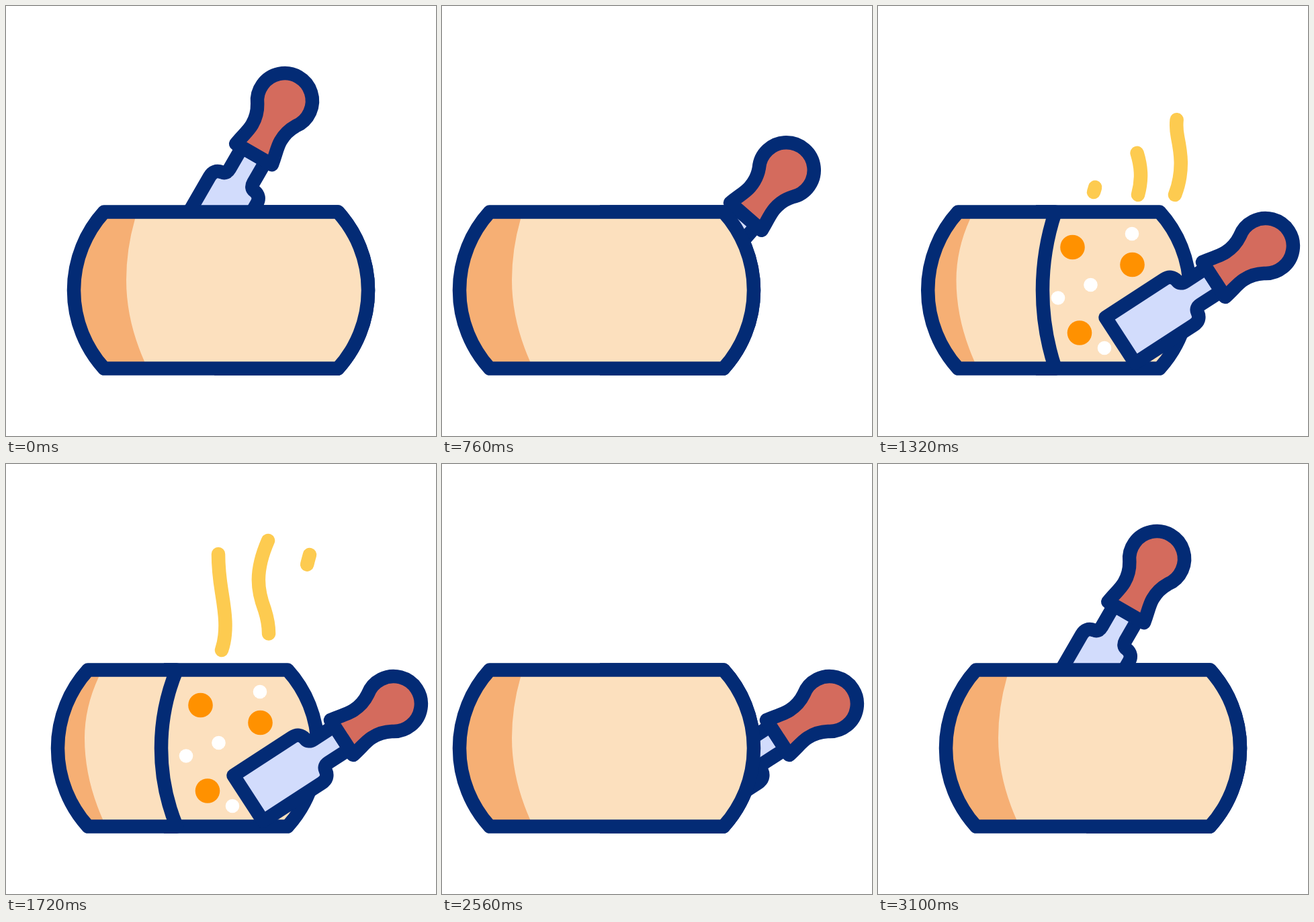
Write an HTML page that moves like this. It is 640 px wide and 640 px high and loops after 3580 ms.

```html
<!DOCTYPE html>
<html lang="en">
<head>
<meta charset="utf-8">
<title>Spread</title>
<style>
  html, body { margin: 0; width: 100%; height: 100%; overflow: hidden; background: #fff; }
  svg { display: block; width: 100vw; height: 100vh; }
  .ink { stroke: #032b75; stroke-width: 20.5; stroke-linejoin: round; }
  .crumb { fill: #fce0be; }
  .shade { fill: #f6af74; }
  .steam { fill: none; stroke: #fdcb50; stroke-width: 20.5; stroke-linecap: round; }
</style>
</head>
<body>
<svg viewBox="0 0 640 640">
  <path id="back" class="ink crumb" d="M310 306.5H494A173.3 173.3 0 0 1 494 539.5H310"/>
  <g id="filling">
    <g fill="#ff9100">
      <circle cx="289.5" cy="359" r="18.3"/>
      <circle cx="378.5" cy="385" r="18.3"/>
      <circle cx="300" cy="486.5" r="18.3"/>
    </g>
    <g fill="#fff">
      <circle cx="378" cy="339" r="10.3"/>
      <circle cx="316.5" cy="415" r="10.3"/>
      <circle cx="268" cy="434.5" r="10.3"/>
      <circle cx="337" cy="509" r="10.3"/>
    </g>
  </g>
  <g id="knife" class="ink">
    <path fill="#d2dcfc" d="M-20.5 92V129Q-20.5 138-28 139Q-40.5 141-40.5 154V258H40.5V154Q40.5 141 28 139Q20.5 138 20.5 129V92Z"/>
    <path fill="#d46b5d" d="M-31 92C-28 74-24.5 66-24.5 55C-24.5 45-26 36-33 24.5A41 41 0 1 1 33 24.5C26 36 24.5 45 24.5 55C24.5 66 28 74 31 92Z"/>
  </g>
  <path id="fill" class="crumb"/>
  <path id="shade" class="shade"/>
  <path id="edge" class="ink" fill="none"/>
  <path class="steam" pathLength="1" d="M442 281C456 245 450 215 446 195S445 160 452 135"/>
  <path class="steam" pathLength="1" d="M387 281C394 255 391 236 385 217C374 188 370 160 390 114"/>
  <path class="steam" pathLength="1" d="M321 277C331 248 325 215 321 190S316 150 316 134"/>
</svg>
<script>
const LOOP = 3580, TOP = 306.5, BOTTOM = 539.5, HALF = 116.5;
const el = id => document.getElementById(id);
const steams = [...document.querySelectorAll('.steam')];

const ease = (t, from, to) => {
  const u = Math.min(1, Math.max(0, (t - from) / (to - from)));
  return u * u * (3 - 2 * u);
};
// rises over the first span, falls over the second
const swing = (t, a, b, c, d) => ease(t, a, b) - ease(t, c, d);

function sideArc(x, bulge) {
  if (Math.abs(bulge) < 0.5) return `L${x} ${BOTTOM}`;
  const r = (HALF * HALF + bulge * bulge) / (2 * Math.abs(bulge));
  return `A${r} ${r} 0 0 ${bulge > 0 ? 1 : 0} ${x} ${BOTTOM}`;
}

function drawLoaf(shift, open) {
  const left = 146 + shift + 51 * open ** 0.9;
  const cut = 494 + shift - 165 * open;
  const outline = `M${left} ${TOP}H${cut}${sideArc(cut, 45 - 68 * open)}H${left}A173.3 173.3 0 0 1 ${left} ${TOP}Z`;
  el('fill').setAttribute('d', outline);
  el('edge').setAttribute('d', outline);
  const m = left - 35 + 68 - 38 * open;
  const top = m + 13 + 8 * open;
  el('shade').setAttribute('d',
    `M${left} ${TOP}H${top}V317Q${m} 362 ${m} 408Q${m} 468 ${m + 27} 529V${BOTTOM}H${left}A173.3 173.3 0 0 1 ${left} ${TOP}Z`);
  el('back').setAttribute('transform', `translate(${shift})`);
}

function drawKnife(t, shift) {
  const slide = swing(t, 205, 430, 2898, 3105);
  const reach = swing(t, 470, 1110, 2595, 2925);
  const drop = swing(t, 390, 1155, 2595, 2925);
  const x = 415 + 124 * slide + 113 * reach + shift;
  const y = 141 + 216 * drop;
  const angle = 30 + 27 * drop ** 1.2;
  el('knife').setAttribute('transform', `translate(${x} ${y}) rotate(${angle})`);
}

function drawSteam(t) {
  steams.forEach((path, i) => {
    const rise = 1020 + 120 * i, fade = 1440 + 190 * i;
    const head = ease(t, rise, rise + 440), tail = ease(t, fade, fade + 350);
    path.style.visibility = t > rise && t < fade + 350 ? 'visible' : 'hidden';
    path.style.strokeDasharray = `${Math.max(0.001, head - tail)} 3`;
    path.style.strokeDashoffset = -tail;
  });
}

function draw(now) {
  const t = now % LOOP;
  const shift = -75 * swing(t, 381, 751, 2580, 2950);
  const open = Math.max(0, swing(t, 870, 1400, 1930, 2480));
  drawLoaf(shift, open);
  drawKnife(t, shift);
  drawSteam(t);
  el('filling').style.visibility = open > 0 ? 'visible' : 'hidden';
}

const start = performance.now();
function tick() {
  draw(performance.now() - start);
  requestAnimationFrame(tick);
}
tick();
</script>
</body>
</html>
```
